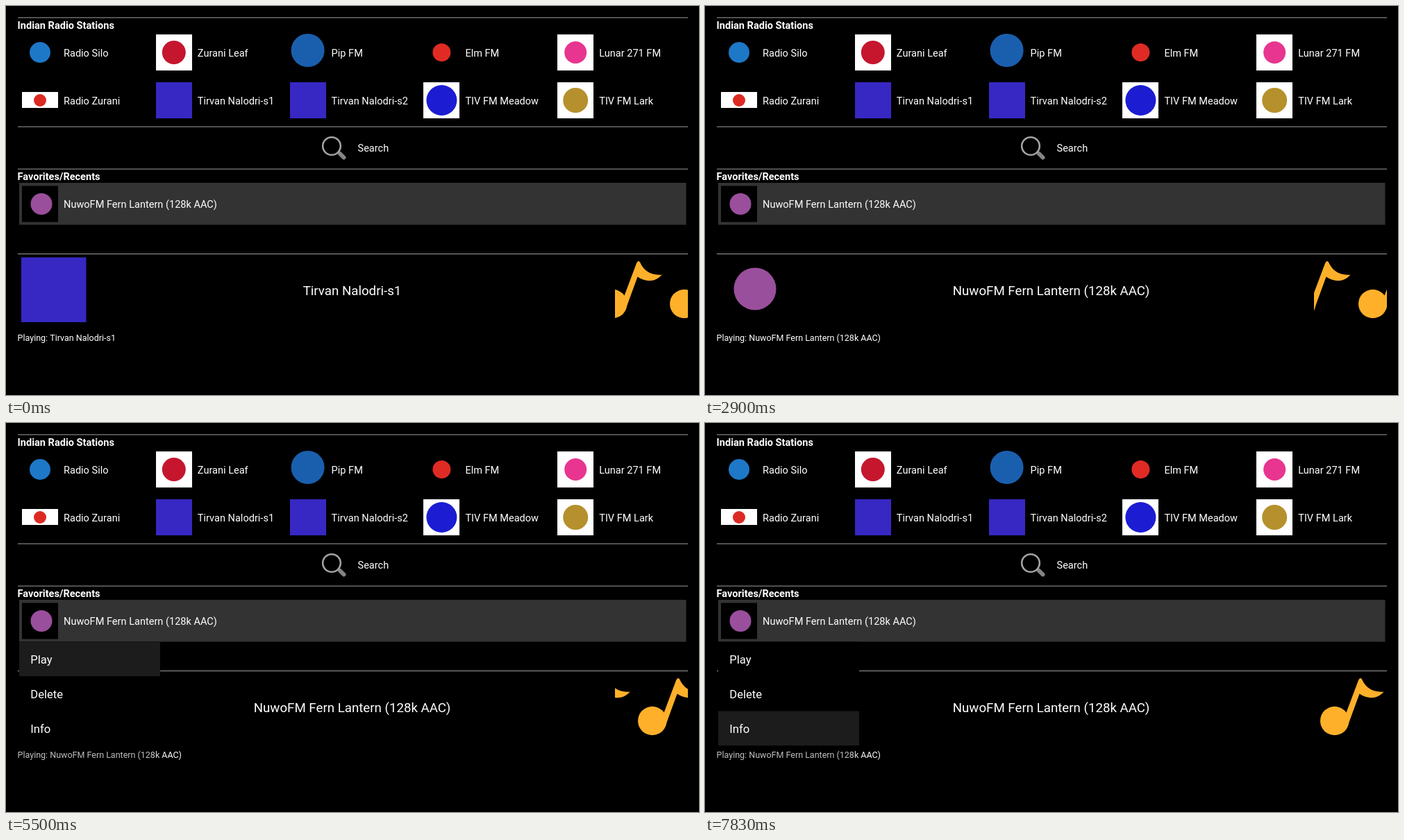
These frames come from a looping animation (998 by 561 pixels, 8000 ms). An HTML page with a canvas:

```html
<!DOCTYPE html>
<html lang="en">
<head>
<meta charset="utf-8">
<title>Radio player</title>
<style>
  html, body { margin: 0; width: 100%; height: 100%; overflow: hidden; background: #000; }
  canvas { display: block; }
</style>
</head>
<body>
<canvas id="stage" width="998" height="561"></canvas>
<script>
const ctx = document.getElementById('stage').getContext('2d');
const LOOP = 8000;
const FAMILY = 'px Roboto, "Noto Sans", sans-serif';
const FIRST = 'Tirvan Nalodri-s1';
const SECOND = 'NuwoFM Fern Lantern (128k AAC)';

// Screen refreshes: [first, last, count], evenly spaced
const runs = [
  [0, 0, 1], [220, 1170, 6], [1950, 2280, 3], [2490, 2900, 5],
  [3090, 3710, 4], [3950, 4140, 2], [4373, 4840, 3], [5060, 5060, 1],
  [5280, 6150, 5], [6390, 7420, 6], [7640, 7830, 2]
];
const ticks = runs.flatMap(([a, b, n]) =>
  Array.from({ length: n }, (_, i) => n > 1 ? a + (b - a) * i / (n - 1) : a));

const SWITCH = 780, IDLE = [1165, 1950];
const MENU = 4373, DELETE = 5710, INFO = 7000;

// Note travel: [time, distance], wrapped inside its window
const travel = [
  [0, 79], [980, 196], [1949, 196], [1950, 7], [2280, 11],
  [3710, 133.3], [4840, 260.5], [6150, 423], [7830, 627]
];
const WINDOW = { x: 877, y: 362, w: 105, h: 96 };
const WRAP = 103;

// Each station: name, tile colour and height, mark colour, mark radius
const stations = [
  ['Radio Silo', null, 0, '#1e78c8', 15],
  ['Zurani Leaf', '#fff', 52, '#c5162e', 17],
  ['Pip FM', null, 0, '#1a5fae', 24],
  ['Elm FM', null, 0, '#e02b25', 13],
  ['Lunar 271 FM', '#fff', 52, '#e83590', 16],
  ['Radio Zurani', '#fff', 23, '#dc2a22', 9],
  [FIRST, '#3728c4', 52],
  ['Tirvan Nalodri-s2', '#3728c4', 52],
  ['TIV FM Meadow', '#fff', 52, '#1c1cd2', 22],
  ['TIV FM Lark', '#fff', 52, '#b5902c', 18]
];

function rect(x, y, w, h, color) {
  ctx.fillStyle = color;
  ctx.fillRect(x, y, w, h);
}

function disc(x, y, r, color) {
  ctx.fillStyle = color;
  ctx.beginPath();
  ctx.arc(x, y, r, 0, Math.PI * 2);
  ctx.fill();
}

function text(str, x, y, size = 14.55, weight = 400, align = 'left') {
  ctx.font = weight + ' ' + size + FAMILY;
  ctx.textAlign = align;
  ctx.fillStyle = '#fff';
  ctx.fillText(str, x, y);
}

function drawStations() {
  stations.forEach(([name, tile, h, mark, r], i) => {
    const x = 23 + 192.8 * (i % 5);
    const cy = i < 5 ? 67 : 136;
    if (tile) rect(Math.round(x), Math.floor(cy - h / 2), 52, h, tile);
    if (mark) disc(x + 26, i === 2 ? 64 : cy, r, mark);
    text(name, x + 60, cy + 5.5);
  });
}

function drawSearch() {
  ctx.lineCap = 'round';
  ctx.strokeStyle = '#858585';
  ctx.lineWidth = 6;
  ctx.beginPath();
  ctx.moveTo(481, 213);
  ctx.lineTo(486.5, 218.5);
  ctx.stroke();
  disc(469, 202, 13, '#000');
  ctx.strokeStyle = '#a3a3a3';
  ctx.lineWidth = 2.6;
  ctx.beginPath();
  ctx.arc(469, 202, 12.8, 0, Math.PI * 2);
  ctx.stroke();
  text('Search', 506.5, 210.3);
}

function note(x, y, sx, sy, color) {
  ctx.save();
  ctx.translate(x, y);
  ctx.scale(sx, sy);
  disc(20.7, 61.5, 20.7, color);
  ctx.beginPath();
  ctx.moveTo(37, 51);
  ctx.lineTo(55, 3);
  ctx.quadraticCurveTo(57.5, -2, 60, 1.5);
  ctx.bezierCurveTo(65, 13, 75, 21, 91.5, 19.5);
  ctx.bezierCurveTo(83, 30, 69, 31, 56.5, 22.5);
  ctx.lineTo(41, 65);
  ctx.fill();
  ctx.restore();
}

function distance(t) {
  const i = travel.findLastIndex(k => k[0] <= t);
  const [t0, d0] = travel[i];
  const [t1, d1] = travel[i + 1] || [t0 + 1, d0];
  return d0 + (d1 - d0) * (t - t0) / (t1 - t0);
}

function drawNote(t) {
  const { x, y, w, h } = WINDOW;
  ctx.save();
  ctx.beginPath();
  ctx.rect(x, y, w, h);
  ctx.clip();
  if (t >= IDLE[0] && t < IDLE[1]) {
    note(x, 362.5, 1.147, 1.147, '#ffb300');
  } else {
    const left = x + distance(t) % WRAP;
    note(left, 368, 1, 1, '#ffb02a');
    note(left - WRAP, 368, 1, 1, '#ffb02a');
  }
  ctx.restore();
}

function drawPlayer(t) {
  const name = t < SWITCH ? FIRST : SECOND;
  if (t < SWITCH) rect(22, 362.5, 93.5, 93.5, '#3728c4');
  else disc(72, 408, 30.5, '#9a4f9c');
  text(name, 498.5, 416.5, 18.7, 400, 'center');
  text('Playing: ' + name, 16.6, 483, 12.5);
  drawNote(t);
}

function drawMenu(t) {
  if (t < MENU) return;
  const shade = ctx.createLinearGradient(16, 0, 236, 0);
  shade.addColorStop(0, 'rgba(0,0,0,.25)');
  shade.addColorStop(0.85, 'rgba(0,0,0,.25)');
  shade.addColorStop(1, 'rgba(0,0,0,0)');
  rect(16, 465, 220, 22, shade);
  rect(19, 315.5, 203, 150, '#000');
  const active = t < DELETE ? 0 : t < INFO ? 1 : 2;
  rect(19, 315.5 + 50 * active, 203, 49.7, '#1c1c1c');
  ['Play', 'Delete', 'Info'].forEach((s, i) => text(s, 35.3, 346.6 + 50 * i, 16.63));
}

function draw(t) {
  rect(0, 0, 998, 561, '#000');
  [16.3, 173.6, 234.6, 357].forEach(y => rect(17, y, 965, 1.04, '#999'));
  text('Indian Radio Stations', 16.6, 33, 14.55, 700);
  drawStations();
  drawSearch();
  text('Favorites/Recents', 16.6, 251, 14.55, 700);
  rect(19, 255, 960.5, 60.5, '#333');
  rect(23, 259.5, 52, 52, '#000');
  disc(51, 285.5, 15.5, '#9a4f9c');
  text(SECOND, 83, 291);
  drawPlayer(t);
  drawMenu(t);
}

function frame(now) {
  const t = now % LOOP;
  draw(ticks.findLast(k => k <= t + 0.5) || 0);
  requestAnimationFrame(frame);
}
requestAnimationFrame(frame);
</script>
</body>
</html>
```
